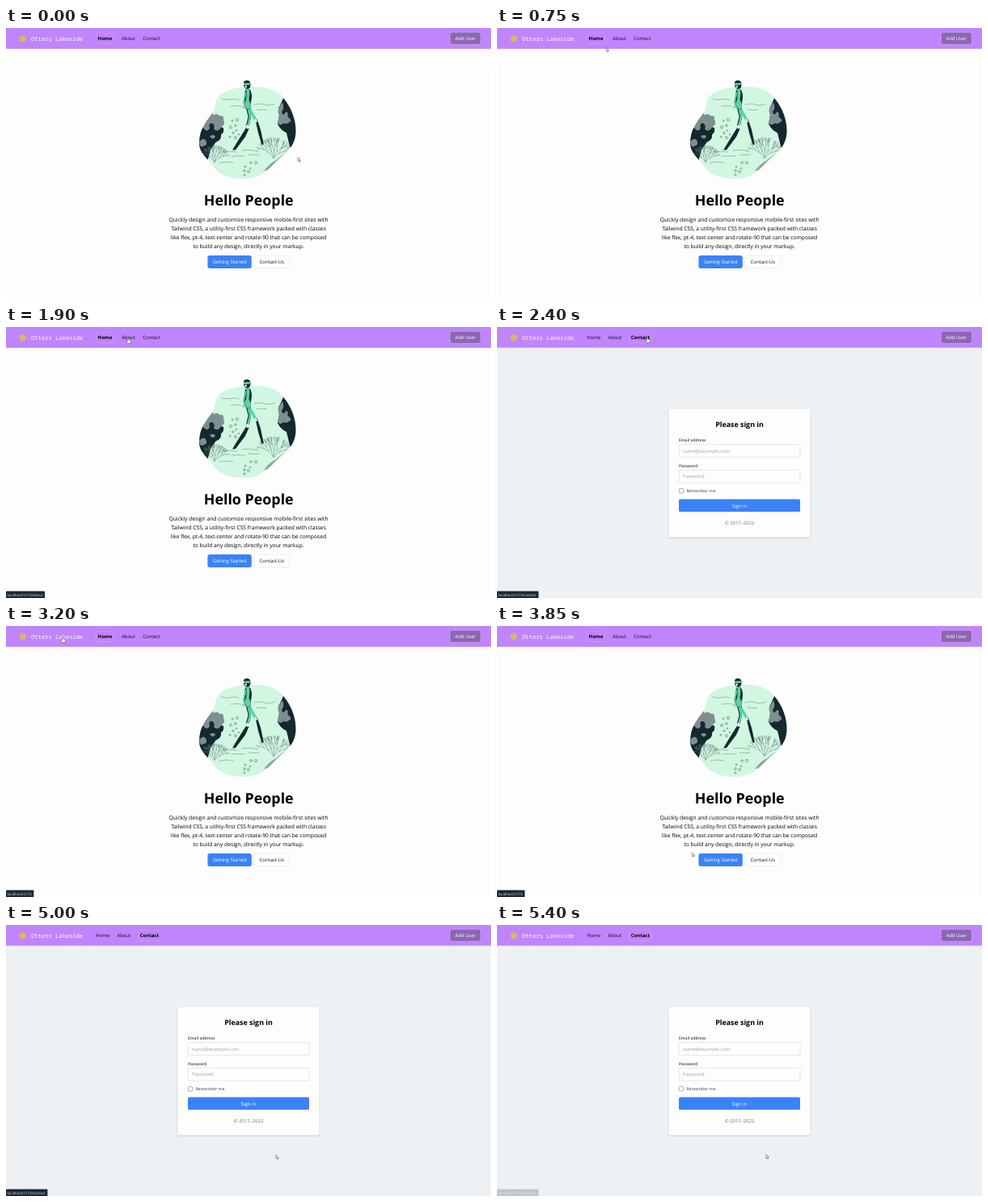
These frames come from a looping animation (600x336 px, 5.45 s). An HTML page:

```html
<!DOCTYPE html>
<html lang="en">
<head>
<meta charset="utf-8">
<title>Otters Lakeside</title>
<style>
html, body { margin: 0; width: 100%; height: 100%; overflow: hidden; background: #fdfdfd; }
svg { display: block; width: 600px; height: 336px; }
text { font: 5.95px "Open Sans", "Noto Sans", sans-serif; fill: #0b101a; text-rendering: geometricPrecision; white-space: pre; }
.mid { text-anchor: middle; }
.bold { font-weight: 700; fill: #000; }
.brand { font: 500 7.17px "Noto Sans Mono", "DejaVu Sans Mono", monospace; fill: #fff; }
.title { font-size: 17.88px; }
.copy { font-size: 6.72px; fill: #000; }
.white { fill: #fff; }
.form-title { font-size: 8.9px; }
.label { font-size: 5px; font-weight: 600; fill: #374151; }
.small { font-size: 5.19px; fill: #374151; }
.hint { fill: #9ca3af; }
.field { fill: #fdfdfd; stroke: #d1d5db; stroke-width: .6; }
.active { fill: none; stroke: #d3abfc; stroke-width: .5; }
.status rect { fill: #1b2836; }
.status text { font-size: 4.45px; fill: #dce1e6; }

.home, .contact, .arrow, .hand, .tip-root, .tip-about { animation: 5450ms step-end infinite; }
.home { animation-name: home; }
.contact { animation-name: contact; }
.arrow { animation-name: arrow; }
.hand { animation-name: hand; }
.tip-root { animation-name: tip-root; }
.tip-about { animation-name: tip-about; }
.tip-contact { animation: tip-contact 5450ms linear infinite; }
.cursor { animation: travel 5450ms ease-in-out infinite; }

@keyframes home {
  0%, 56.88% { opacity: 1; }
  41.28%, 91.74%, 100% { opacity: 0; }
}
@keyframes contact {
  0%, 56.88% { opacity: 0; }
  41.28%, 91.74%, 100% { opacity: 1; }
}
@keyframes arrow {
  0%, 63.3%, 91.74%, 100% { opacity: 1; }
  15.6%, 73.2% { opacity: 0; }
}
@keyframes hand {
  0%, 63.3%, 91.74%, 100% { opacity: 0; }
  15.6%, 73.2% { opacity: 1; }
}
@keyframes tip-root {
  0%, 30.28%, 71.93%, 100% { opacity: 0; }
  17.43%, 53.21% { opacity: 1; }
}
@keyframes tip-about {
  0%, 37.61%, 100% { opacity: 0; }
  30.28% { opacity: 1; }
}
@keyframes tip-contact {
  0%, 37.6% { opacity: 0; }
  37.61%, 53.2% { opacity: 1; }
  53.21%, 81.6% { opacity: 0; }
  81.65%, 97.25% { opacity: 1; }
  99.63%, 100% { opacity: 0; }
}
@keyframes travel {
  0%, 1.83% { transform: translate(361.5px, 160.5px); }
  16.51% { transform: translate(118px, 14px); }
  24.77% { transform: translate(122px, 14px); }
  27.52% { transform: translate(139.5px, 13.5px); }
  30.28%, 34.86% { transform: translate(151px, 13px); }
  39.45% { transform: translate(179px, 12px); }
  44.04% { transform: translate(186px, 12px); }
  49.54% { transform: translate(184px, 12px); }
  55.96% { transform: translate(72px, 13px); }
  58.72%, 61.47% { transform: translate(70px, 13px); }
  70.64% { transform: translate(241.3px, 281px); }
  74.31% { transform: translate(262px, 288px); }
  77.98% { transform: translate(280px, 289px); }
  81.65% { transform: translate(325px, 287px); }
  85.32%, 91.74% { transform: translate(334px, 285px); }
  94%, 100% { transform: translate(333px, 284.5px); }
}
</style>
</head>
<body>
<svg viewBox="0 0 600 336" xmlns="http://www.w3.org/2000/svg">
  <defs>
    <clipPath id="blob-clip"><use href="#blob"/></clipPath>
    <filter id="shade" x="-10%" y="-10%" width="120%" height="120%">
      <feDropShadow dx="0" dy=".8" stdDeviation=".8" flood-color="#64748b" flood-opacity=".4"/>
    </filter>
  </defs>

  <rect width="600" height="336" fill="#fdfdfd"/>
  <rect width="600" height="25.8" fill="#c084fc"/>
  <circle cx="20.8" cy="13.2" r="4.2" fill="#d8b46a"/>
  <text class="brand" x="31" y="15.6">Otters Lakeside</text>
  <rect x="549.3" y="5.3" width="38" height="15" rx="2.800" fill="#8b66b2" stroke="#cdb6e4" stroke-width=".6"/>
  <text class="mid white" x="568.2" y="15.2">Add User</text>

  <g class="home">
    <rect class="active" x="111.2" y="6.3" width="22.4" height="13.2" rx="2"/>
    <text class="mid bold" x="122.4" y="15.2">Home</text>
    <text x="143" y="15.2">About</text>
    <text x="169.2" y="15.2">Contact</text>

    <path id="blob" fill="#d1f7e2" d="M266 82C277 75 288 73 302 73C320 72 336 76 344 88C353 99 359 114 358.500 129C358 144 350 152 340 160C329 170 318 187 296 187C279 187 265 184 256 171C249 161 239 155 239 143C239 126 247 117 255 106C261 97 257 89 266 82Z"/>
    <g clip-path="url(#blob-clip)">
      <path fill="#7f8f8f" d="M243 114L249 104Q254 102 257 108Q262 105 264 109Q270 108 269 114Q272 119 267 122Q270 128 265 131L261 142L248 130L240 132Z"/>
      <path fill="#14282f" d="M237 126Q243 121 246 126Q250 129 252 124Q250 118 255 118Q259 120 257 125Q260 129 264 126Q266 122 269 124Q270 130 266 132Q267 139 260 141L253 151L249 166L236 160Z"/>
      <path fill="#7f8f8f" d="M239 141Q244 135 247 139Q250 145 245 146Q240 150 239 141ZM252 134Q258 131 259 135Q255 140 252 134Z"/>
      <path fill="#14282f" d="M343 87L339 96Q335 101 338 108L336 119Q340 127 347 130L351 147L358 154L362 84Z"/>
      <path fill="#7f8f8f" d="M342 92L339 97Q335 102 338 108L336 118Q340 122 343 118Q348 120 350 117Q354 116 351 112Q347 110 349 106Q346 102 345 106Q342 109 341 104Q345 99 342 92Z"/>
      <path fill="#8fa5a0" d="M359 148Q342 156 334 164Q327 167 319 177L328 176L358 158Z"/>
      <path fill="none" stroke="#50756c" stroke-width=".45" stroke-linecap="round" d="M267 88q6 2 11 .5t10 .5M278 97q8-1.500 13 0M307 95q8-2 13 0t13-1M310 101q6 1 12 .5M269 154q9-2 16 0M292 152q8-2 20 1M279 159q9-1 16 0M300 157q7 1 13 0M264 167q9-2 17 0"/>
      <path id="coral" fill="none" stroke="#5b7570" stroke-width=".4" stroke-linecap="round"/>
    </g>
    <g id="bubbles" fill="none" stroke="#36594f" stroke-width=".5"/>

    <g stroke-linejoin="round" stroke-linecap="round">
      <path fill="#14282f" d="M297.500 123L300.500 125L296 135L284 151L280 151.500L285 143Z"/>
      <path fill="#14282f" d="M308.500 114L310.500 113L315 126L318.800 144L316.500 145L312 130Z"/>
      <path fill="none" stroke="#14282f" stroke-width="3.600" d="M298.500 98L301.500 110L299 120"/>
      <path fill="none" stroke="#57d5a2" stroke-width="2.400" d="M299 98L302 110L299.500 120"/>
      <path fill="none" stroke="#57d5a2" stroke-width="3.400" d="M300 98L304.500 106L308.800 114"/>
      <path fill="none" stroke="#fff" stroke-width="2" d="M299 121L298.500 124M308.800 114L309.700 116"/>
      <path fill="#57d5a2" stroke="#14282f" stroke-width=".4" d="M296.500 76Q299 74.500 302 77Q304.500 84 302.800 92L302 101L297 100Q294 94 295 88Z"/>
      <path fill="#14282f" d="M301 76Q304 79 304 86L302.500 94L300.500 89Q302 82 301 76ZM296.500 77L298 79L297 89L294.500 95L293.500 92Z"/>
      <path fill="none" stroke="#57d5a2" stroke-width="1.600" d="M297 80L294.500 89L294.500 95"/>
      <circle cx="294" cy="98" r="1.300" fill="#fff" stroke="#14282f" stroke-width=".35"/>
      <path fill="#14282f" d="M294 68Q294 65 298 65Q302.500 65 302.500 70Q302.500 75 299 75.500Q295 75 294 72Z"/>
      <path fill="#57d5a2" d="M293.800 68.500L302 68L301.700 70.500L294.300 71.300Z"/>
      <path fill="#fff" d="M295 72L298 71.800L297.500 74L296 74Z"/>
    </g>

    <text class="mid bold title" x="300.2" y="219.5">Hello People</text>
    <text class="mid copy" x="300" y="240.2">Quickly design and customize responsive mobile-first sites with</text>
    <text class="mid copy" x="300" y="251.1">Tailwind CSS, a utility-first CSS framework packed with classes</text>
    <text class="mid copy" x="300" y="262.1">like flex, pt-4, text-center and rotate-90 that can be composed</text>
    <text class="mid copy" x="300" y="273">to build any design, directly in your markup.</text>
    <rect x="249.4" y="281.900" width="54.400" height="16" rx="2.600" fill="#3b82f6"/>
    <text class="mid white" x="276.6" y="292.3">Getting Started</text>
    <rect x="307" y="282.2" width="43.6" height="15.6" rx="2.600" fill="#fff" stroke="#e0e3e8" stroke-width=".6"/>
    <text class="mid" x="328.8" y="292.3">Contact-Us</text>
  </g>

  <g class="contact">
    <rect y="25.8" width="600" height="311" fill="#eef1f4"/>
    <text x="111.3" y="15.2">Home</text>
    <text x="137.4" y="15.2">About</text>
    <rect class="active" x="163.6" y="6.3" width="27.4" height="13.2" rx="2"/>
    <text class="mid bold" x="177.4" y="15.2">Contact</text>

    <rect x="212.5" y="101.8" width="175" height="158.600" rx="1.6" fill="#fdfdfd" filter="url(#shade)"/>
    <text class="mid bold form-title" x="300" y="124">Please sign in</text>
    <text class="label" x="225" y="142">Email address</text>
    <rect class="field" x="225" y="145.6" width="150" height="15.8" rx="1.6"/>
    <text class="hint" x="230" y="155.8">name@example.com</text>
    <text class="label" x="225" y="173.7">Password</text>
    <rect class="field" x="225" y="177.3" width="150" height="15.8" rx="1.6"/>
    <text class="hint" x="230" y="187.4">Password</text>
    <rect x="225.4" y="200.4" width="5.400" height="5.400" rx="1" fill="#fff" stroke="#767676" stroke-width=".6"/>
    <text class="small" x="234.4" y="205.4">Remember me</text>
    <rect x="225" y="213.4" width="150" height="15.600" rx="1.6" fill="#3b82f6"/>
    <text class="mid white" x="300" y="223.6">Sign in</text>
    <text class="mid" x="300" y="245.4" style="fill:#6b7280">© 2017–2022</text>
  </g>

  <g class="status">
    <g class="tip-root"><rect y="327.4" width="34.4" height="9" rx="1"/><text x="1.5" y="333.6">localhost:5173</text></g>
    <g class="tip-about"><rect y="327.4" width="48" height="9" rx="1"/><text x="1.5" y="333.6">localhost:5173/about</text></g>
    <g class="tip-contact"><rect y="327.4" width="51.4" height="9" rx="1"/><text x="1.5" y="333.6">localhost:5173/contact</text></g>
  </g>

  <g class="cursor" fill="#fff" stroke="#222" stroke-width=".45" stroke-linejoin="round">
    <path class="arrow" d="M0 0V4.600L1.100 3.700L1.800 5.400L2.600 5.100L1.900 3.400H3.300Z"/>
    <path class="hand" d="M-.7 .6Q0-.3 .7 .6V3L3 3.500Q3.700 3.800 3.600 4.600L3 7.500H-.6L-2.300 4.900Q-1.900 4-.7 4.900Z"/>
  </g>
</svg>
<script>
let seed = 7;
const random = () => (seed = seed * 16807 % 2147483647) / 2147483647;

function branch(x, y, angle, length, depth) {
  const endX = x + Math.cos(angle) * length;
  const endY = y + Math.sin(angle) * length;
  let path = `M${x.toFixed(1)} ${y.toFixed(1)}L${endX.toFixed(1)} ${endY.toFixed(1)}`;
  if (depth) {
    for (const side of [-1, 1]) {
      const turn = side * (0.12 + random() * 0.3);
      path += branch(endX, endY, angle + turn, length * 0.8, depth - 1);
    }
  }
  return path;
}

function coral(x, y, size, lean) {
  return [-0.8, -0.4, 0, 0.4, 0.8]
    .map(turn => branch(x, y, lean + turn, size, 3)).join("");
}

document.getElementById("coral").setAttribute("d",
  coral(258, 166, 7, -1.5) + coral(331, 161, 8.6, -1.5));

const bubbles = [
  [286, 114, 1.7], [280, 115, 1], [284, 121, 1.3], [278, 123, 1.6], [285, 127, .8],
  [281, 130, 1.2], [277, 135, 1], [284, 136, 1.5], [288, 132, .7],
  [303, 167, 1.3], [309, 167, 1.6], [296, 172, 1], [302, 174, .8],
  [295, 177, 1.3], [300, 178, 1.5], [295, 182, 1.1]
];
document.getElementById("bubbles").innerHTML = bubbles
  .map(([x, y, r]) => `<circle cx="${x}" cy="${y}" r="${r}"/>`).join("");
</script>
</body>
</html>
```
